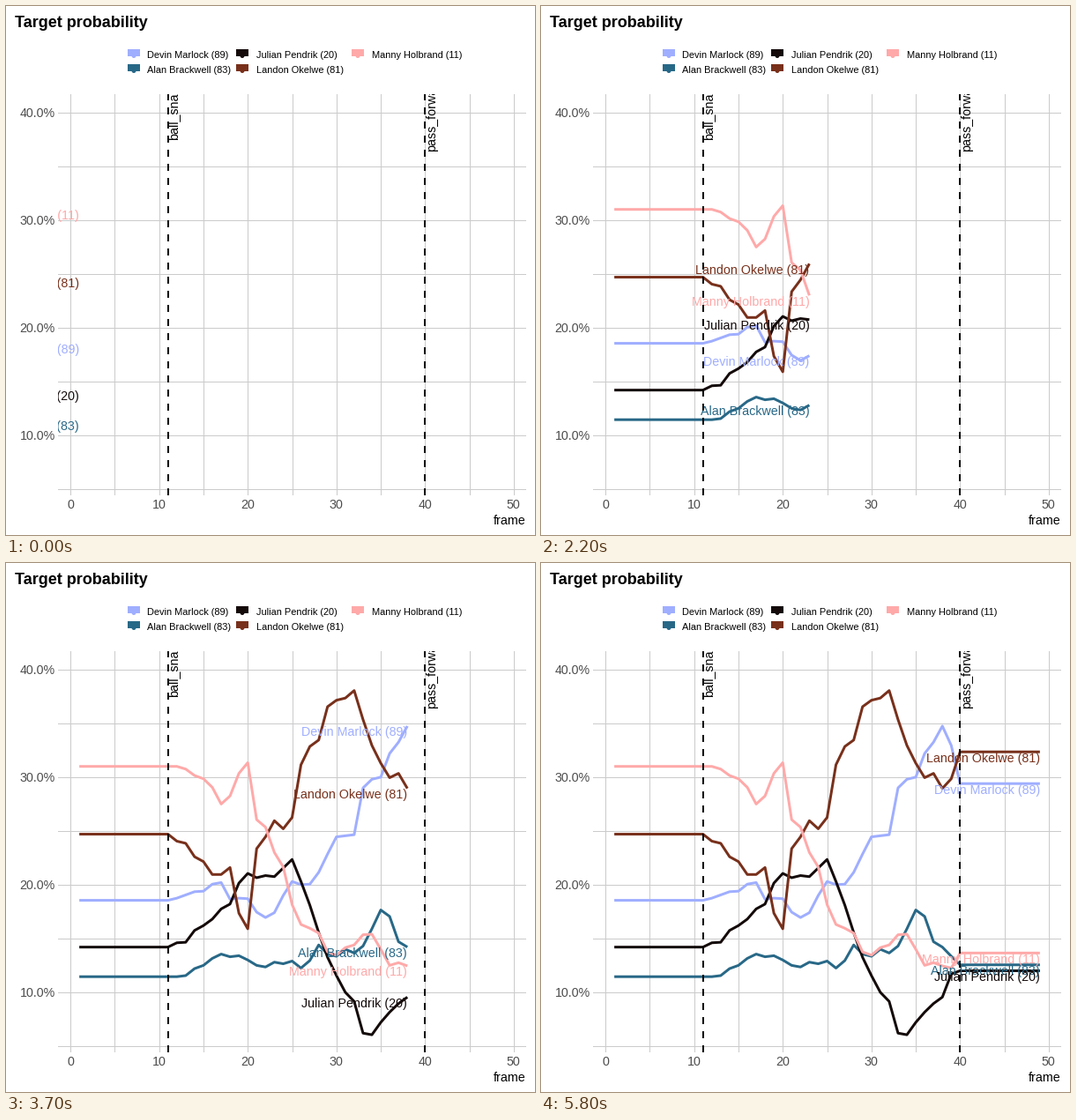
Recreate the animation shown at these times as a matplotlib script. Size 600 by 600 pixels, loop 5.9 s.

```python
import matplotlib.pyplot as plt
import numpy as np
from matplotlib.animation import FuncAnimation
from matplotlib.patches import Ellipse, Rectangle

SIZE, DPI = 600, 100
PT = 72 / DPI  # points per pixel
LAST, FRAMES = 49, 59
TEXT = 14.2 * PT
DROP = 11.5 * PT  # text hangs this far below its anchor

plt.rcParams["font.family"] = "Liberation Sans"

# Percentages from the snap (11) to the throw (40), flat outside
marlock = [18.6, 18.8, 19.1, 19.4, 19.45, 20.1, 20.25, 18.7, 18.8, 18.75,
           17.5, 17.0, 17.45, 19.05, 20.35, 20.05, 20.1, 21.2, 22.9, 24.5,
           24.6, 24.7, 29.05, 29.85, 30.05, 32.25, 33.3, 34.8, 33.0, 29.45]
brackwell = [11.5, 11.5, 11.6, 12.25, 12.55, 13.2, 13.6, 13.35, 13.45, 13.05,
             12.55, 12.4, 12.85, 12.7, 12.95, 12.3, 13.0, 14.45, 13.6, 13.4,
             14.05, 13.7, 14.35, 15.95, 17.7, 17.1, 14.75, 14.25, 13.4, 12.6]
pendrik = [14.25, 14.65, 14.7, 15.8, 16.25, 16.85, 17.8, 18.25, 20.2, 21.1,
           20.7, 20.9, 20.8, 21.6, 22.4, 20.35, 18.15, 15.6, 13.3, 11.6,
           10.05, 9.2, 6.25, 6.1, 7.25, 8.2, 9.0, 9.6, 11.75, 12.05]
okelwe = [24.75, 24.1, 23.9, 22.65, 22.2, 21.0, 21.0, 21.65, 17.4, 15.95,
          23.4, 24.5, 26.0, 25.25, 26.3, 31.2, 32.9, 33.5, 36.6, 37.2,
          37.4, 38.1, 35.4, 33.0, 31.35, 30.0, 30.4, 29.0, 29.9, 32.4]
holbrand = [31.05, 31.05, 30.8, 30.2, 29.9, 29.1, 27.55, 28.3, 30.4, 31.4,
            26.1, 25.4, 23.05, 21.7, 18.2, 16.35, 16.0, 15.55, 13.8, 13.5,
            14.2, 14.45, 15.4, 15.45, 14.05, 12.55, 12.8, 12.5, 12.3, 13.7]

# label, colour, values, legend position
PLAYERS = [
    ("Devin Marlock (89)", "#9faeff", marlock, (138, 49)),
    ("Alan Brackwell (83)", "#286887", brackwell, (138, 66)),
    ("Julian Pendrik (20)", "#140a0a", pendrik, (261, 49)),
    ("Landon Okelwe (81)", "#78301b", okelwe, (261, 66)),
    ("Manny Holbrand (11)", "#ffa9a9", holbrand, (392, 49)),
]

fig = plt.figure(figsize=(SIZE / DPI, SIZE / DPI), dpi=DPI, facecolor="white")


def write(x, y, text, size=14.2, **style):
    """Text at a pixel position, y measured down to the baseline."""
    fig.text(x / SIZE, 1 - y / SIZE, text, fontsize=size * PT,
             va="baseline", **style)


def legend_key(x, y, color, label):
    style = dict(color=color, lw=0, transform=fig.transFigure)
    fig.add_artist(Rectangle((x / SIZE, 1 - (y + 8) / SIZE),
                             14 / SIZE, 8 / SIZE, **style))
    fig.add_artist(Ellipse(((x + 7) / SIZE, 1 - (y + 7.5) / SIZE),
                           5 / SIZE, 5 / SIZE, **style))
    write(x + (22 if x < 200 else 23), y + 10, label, 11)


# Panel
left, right, top, bottom = 59, 590, 100, 555
ax = fig.add_axes([left / SIZE, 1 - bottom / SIZE,
                   (right - left) / SIZE, (bottom - top) / SIZE])
ax.set_xlim(-1.4, 51.4)
ax.set_ylim(4.467, 41.762)
ax.set_xticks(range(0, 51, 5))
ax.set_yticks(range(5, 41, 5))
ax.tick_params(length=0, labelleft=False, labelbottom=False)
ax.grid(color="#cbcbcb", lw=PT)
ax.set_axisbelow(True)
for spine in ax.spines.values():
    spine.set_visible(False)

# Titles, axis labels and legend
write(10, 24, "Target probability", 18, weight="bold")
write(590, 588, "frame", ha="right")
for x in range(0, 51, 10):
    write(73.2 + 10.05 * x, 570, str(x), ha="center", color="#4d4d4d")
for p in range(10, 41, 10):
    write(56, 614.5 - 12.2 * p, f"{p:.1f}%", ha="right", color="#4d4d4d")
for label, color, _, (x, y) in PLAYERS:
    legend_key(x, y, color, label)

# Moving lines and their labels
steps = np.arange(1, LAST + 1)
tracks = []
for i, (label, color, values, _) in enumerate(PLAYERS):
    path = np.interp(steps, np.arange(11, 41), values)
    line, = ax.plot([], [], color=color, lw=3 * PT, zorder=3 + i / 10,
                    solid_capstyle="butt", solid_joinstyle="round")
    tag = ax.annotate(label, (1, path[0]), (0, -DROP),
                      textcoords="offset points", ha="right", va="baseline",
                      fontsize=TEXT, color=color, clip_on=True,
                      zorder=4 + i / 10)
    tracks.append((path, line, tag))

# Event markers
for x, name in ((11, "ball_snap"), (40, "pass_forward")):
    ax.axvline(x, color="black", lw=2 * PT, ls=(0, (4, 4)), zorder=5)
    ax.annotate(name, (x, 40), (DROP, 0), textcoords="offset points",
                rotation=90, rotation_mode="anchor", ha="center",
                va="baseline", fontsize=TEXT, clip_on=True, zorder=6)


def update(frame):
    n = min(frame + 1, LAST)
    for path, line, tag in tracks:
        line.set_data(steps[:n], path[:n])
        tag.xy = (n, path[n - 1])
    return [artist for track in tracks for artist in track[1:]]


anim = FuncAnimation(fig, update, frames=FRAMES, interval=100, repeat=True)
plt.show()
```
